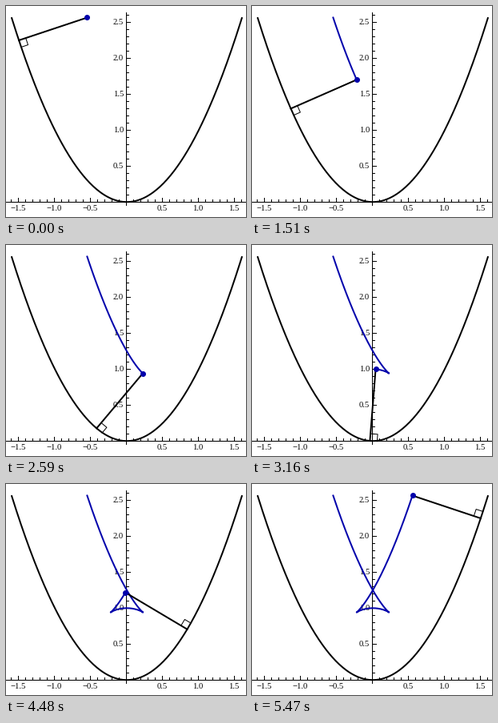
These frames come from a looping animation (300 px wide and 264 px high, 6.47 s). A matplotlib script:

```python
import numpy as np
import matplotlib.pyplot as plt
from matplotlib.animation import FuncAnimation

WIDTH, HEIGHT, DPI = 300, 264, 100
PX = 72 / DPI                       # one pixel in points
UNIT = 89.9
ORIGIN = 151.0, 245.2               # of the curves
AXES = 150.5, 245.5                 # pixel centres of the axis lines
BLUE = (0, 0, 0.67)

TICK_MS, LOOP_MS = 10, 6470
START_MS, STEP_MS, STEPS = 1000, 30, 150
T_START, T_END = -1.5, 1.5
DISTANCE, CORNER = 1.0, 0.1

plt.rcParams["text.kerning_factor"] = 6
fig = plt.figure(figsize=(WIDTH / DPI, HEIGHT / DPI), dpi=DPI, facecolor="white")
ax = fig.add_axes([0, 0, 1, 1])
ax.set_xlim(0, WIDTH)
ax.set_ylim(HEIGHT, 0)
ax.axis("off")


def to_px(x, y, origin=ORIGIN):
    return origin[0] + UNIT * np.asarray(x), origin[1] - UNIT * np.asarray(y)


def stroke(xs=(), ys=(), width=2.0, color="black", **style):
    return ax.plot(xs, ys, color=color, lw=width * PX, snap=False, **style)[0]


def label(x, y, value, align):
    text = f"{value:.1f}".replace("-", "\u2212")
    ax.text(x, y, text, family="Liberation Serif", size=10.6 * PX,
            ha=align, va="baseline", zorder=1)


def draw_axes():
    """Axes with a tick every 0.1 and a label every 0.5."""
    axis_x, axis_y = AXES
    xs = [0, WIDTH, np.nan, axis_x, axis_x, np.nan]
    ys = [axis_y, axis_y, np.nan, 8, 250, np.nan]
    for k in range(-16, 27):
        if k == 0:
            continue
        major = k % 5 == 0
        length = 5.5 if major else 3.5
        px, py = (np.floor(v) + 0.5 for v in to_px(k / 10, k / 10, AXES))
        if k <= 16:
            xs += [px, px, np.nan]
            ys += [axis_y, axis_y - length, np.nan]
            if major:
                label(px - 0.5, 256, k / 10, "center")
        if k > 0:
            xs += [axis_x, axis_x + length, np.nan]
            ys += [py, py, np.nan]
            if major:
                label(147, py + 2.5, k / 10, "right")
    stroke(xs, ys, width=1, solid_capstyle="butt", zorder=1)


def frame_at(t):
    """Foot on the parabola with its unit tangent and unit normal."""
    size = np.sqrt(1 + 4 * t * t)
    foot = np.array([t, t * t])
    tangent = np.array([np.ones_like(t), 2 * t]) / size
    normal = np.array([-2 * t, np.ones_like(t)]) / size
    return foot, tangent, normal


def parallel(t):
    foot, _, normal = frame_at(t)
    return foot + DISTANCE * normal


draw_axes()
x = np.linspace(-1.6, 1.6, 201)
stroke(*to_px(x, x * x), solid_capstyle="projecting", zorder=2)
trace = stroke(color=BLUE, solid_capstyle="projecting",
               solid_joinstyle="round", zorder=3)
corner = stroke(width=1, zorder=4)
segment = stroke(zorder=5)
dot = stroke(color=BLUE, marker="o", ms=7 * PX, mew=0, zorder=6)


def update(index):
    elapsed = index * TICK_MS - START_MS
    step = min(max(elapsed // STEP_MS + 1, 0), STEPS)
    t = T_START + (T_END - T_START) * step / STEPS
    foot, tangent, normal = frame_at(t)
    tip = foot + DISTANCE * normal
    square = np.array([foot + CORNER * normal,
                       foot + CORNER * (normal + tangent),
                       foot + CORNER * tangent]).T

    trace.set_data(*to_px(*parallel(np.linspace(T_START, t, 2 * step + 2))))
    corner.set_data(*to_px(*square))
    segment.set_data(*to_px(*np.array([foot, tip]).T))
    dot.set_data(*to_px(*tip.reshape(2, 1)))
    return trace, corner, segment, dot


animation = FuncAnimation(fig, update, frames=LOOP_MS // TICK_MS,
                          interval=TICK_MS, repeat=True, repeat_delay=0)
plt.show()
```
